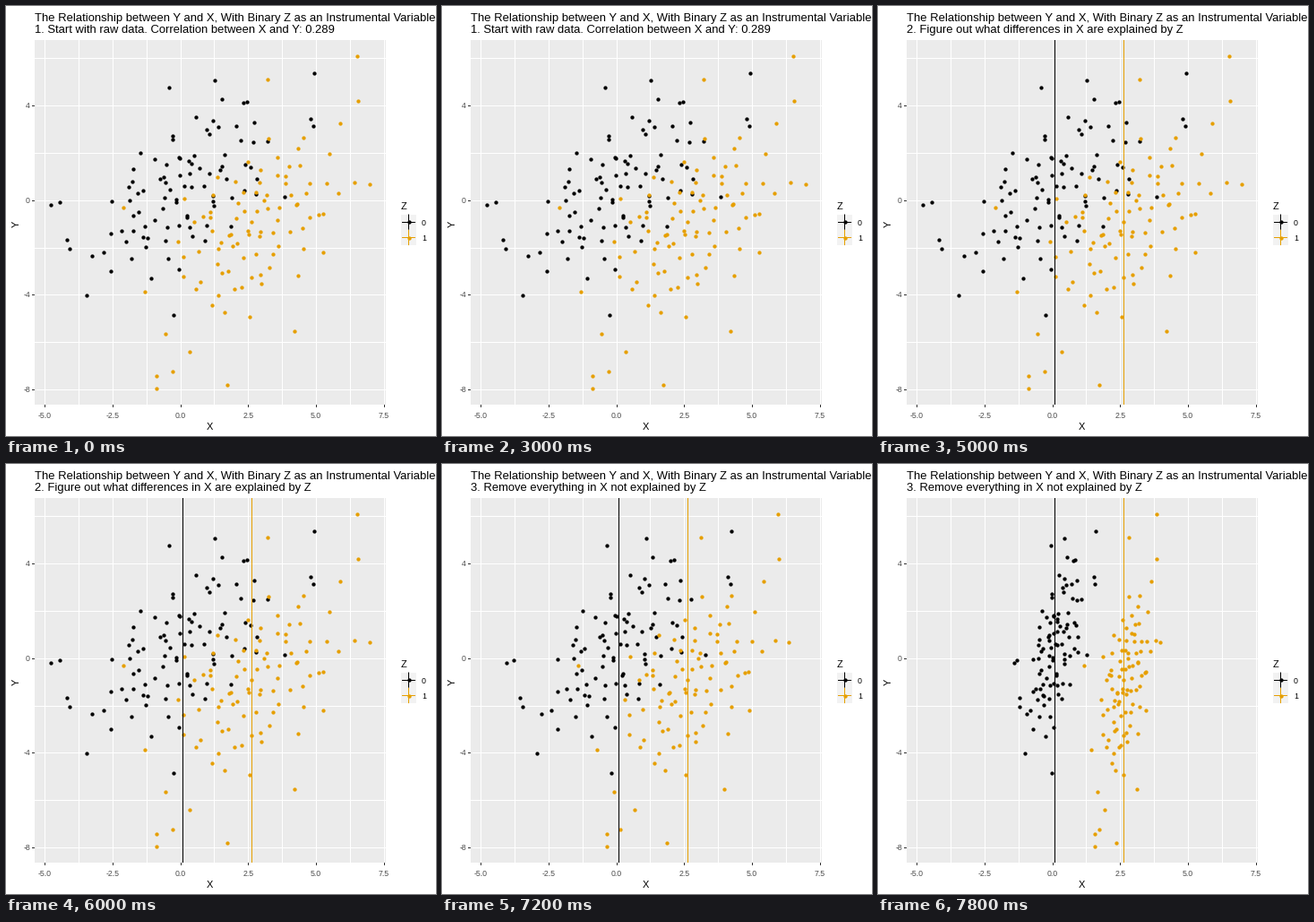
Animation, 480 px wide and 480 px high, one loop 8 s. Source, as a matplotlib script:

```python
import numpy as np
import matplotlib.pyplot as plt
from matplotlib.animation import FuncAnimation
from matplotlib.patches import Rectangle

plt.rcParams["font.family"] = "Liberation Sans"

SIZE = 480
FRAMES, INTERVAL = 40, 200
LEFT, RIGHT, TOP, BOTTOM = 32, 424, 38, 445
COLORS = BLACK, ORANGE = "#000000", "#E69F00"
MEANS = (197, 274)

TITLE = "The Relationship between Y and X, With Binary Z as an Instrumental Variable"
STEPS = (
    "1. Start with raw data. Correlation between X and Y: 0.289",
    "2. Figure out what differences in X are explained by Z",
    "3. Remove everything in X not explained by Z",
)
STEP_2, LINES_IN, SQUEEZE = 21, 23, 34  # frames where each stage begins
SQUEEZE_LENGTH = 8

# The few extreme observations, in stage pixels.
EXTREMES_0 = [(50, 222), (60, 219), (68, 261), (71, 271), (90, 323),
              (182, 91), (187, 345), (233, 83), (241, 104), (269, 107),
              (311, 213), (340, 126), (343, 134), (344, 75)]
EXTREMES_1 = [(131, 225), (168, 413), (168, 427), (178, 366), (186, 408),
              (205, 386), (247, 423), (292, 82), (322, 363), (373, 131),
              (389, 197), (392, 56), (393, 106), (406, 199)]

rng = np.random.default_rng(7)


def sample(count, center, spread, corr, reach=1.9):
    """Evenly covered, jittered bivariate normal cut off at `reach` sigmas."""
    k = np.arange(count) + 0.5
    radius = np.sqrt(-2 * np.log(1 - k / count * (1 - np.exp(-reach ** 2 / 2))))
    angle = k * np.pi * (3 - np.sqrt(5))
    a = radius * np.cos(angle) + rng.normal(0, 0.13, count)
    b = radius * np.sin(angle) + rng.normal(0, 0.13, count)
    b = corr * a + np.sqrt(1 - corr ** 2) * b
    return np.column_stack([center[0] + spread[0] * a,
                            center[1] - spread[1] * b])


def px(x):
    return 194.65 + 30.25 * x


def py(y):
    return 216.65 - 26.45 * y


fig = plt.figure(figsize=(SIZE / 72, SIZE / 72), dpi=72, facecolor="white")
ax = fig.add_axes([0, 0, 1, 1])
ax.set_xlim(0, SIZE)
ax.set_ylim(SIZE, 0)
ax.axis("off")


def box(x, y, w, h, color):
    ax.add_patch(Rectangle((x, y), w, h, fc=color, lw=0, zorder=0))


def vline(x, top, bottom, color, zorder=1):
    """One-pixel column."""
    return ax.plot([round(x) + 0.5] * 2, [top, bottom], color=color, lw=1,
                   zorder=zorder, solid_capstyle="butt", snap=False)[0]


def hline(y, left, right, color):
    """One-pixel row."""
    ax.plot([left, right], [round(y) + 0.5] * 2, color=color, lw=1,
            zorder=1, solid_capstyle="butt", snap=False)


def label(x, y, text, size, color="black", ha="left", **kw):
    return ax.text(x, y, text, size=size, color=color, ha=ha,
                   va=kw.pop("va", "baseline"), **kw)


def dots(points, color):
    return ax.scatter(*np.transpose(points), s=4.3 ** 2, c=color,
                      linewidths=0, antialiased=False, zorder=3)


def draw_panel():
    box(LEFT, TOP, RIGHT - LEFT, BOTTOM - TOP, "#EBEBEB")
    for x in np.arange(-5, 7.6, 1.25):
        vline(px(x), TOP, BOTTOM, "white")
    for y in range(-8, 7, 2):
        hline(py(y), LEFT, RIGHT, "white")
    for x in np.arange(-5, 7.6, 2.5):
        vline(px(x), BOTTOM, BOTTOM + 3, "#333333")
        label(px(x), 460.5, f"{x:.1f}", 8.8, "#4D4D4D", "center")
    for y in range(-8, 5, 4):
        hline(py(y), LEFT - 3, LEFT, "#333333")
        label(27, py(y) + 3, str(y), 8.8, "#4D4D4D", "right")
    label(227.7, 473, "X", 11, ha="center")
    label(11.5, 243, "Y", 11, ha="center", va="center", rotation=90)


def draw_legend():
    label(441, 227, "Z", 11)
    for row, color in enumerate(COLORS):
        top = 232.5 + 17.3 * row
        mid = top + 8.7
        box(441, top, 17.3, 17.3, "#F2F2F2")
        vline(449, top, top + 17.3, color)
        hline(mid - 0.5, 442, 457, color)
        dots([(449.5, mid)], color)
        label(464, mid + 4, str(row), 8.8)


draw_panel()
draw_legend()
label(32, 17, TITLE, 12.97)
subtitle = label(32, 30, STEPS[0], 12.97)

groups = (
    np.vstack([EXTREMES_0, sample(84, (197, 205), (56, 57), 0.55)]),
    np.vstack([EXTREMES_1, sample(84, (278, 244), (54, 58), 0.45)]),
)
clouds = [dots(g, c) for g, c in zip(groups, COLORS)]
mean_lines = [vline(m, TOP, BOTTOM, c, zorder=4)
              for m, c in zip(MEANS, COLORS)]


def update(i):
    subtitle.set_text(STEPS[(i >= STEP_2) + (i > SQUEEZE)])
    t = np.clip((i - SQUEEZE) / SQUEEZE_LENGTH, 0, 1)
    eased = (1 - np.cos(np.pi * t)) / 2
    for cloud, points, mean, rule in zip(clouds, groups, MEANS, mean_lines):
        x = points[:, 0] + (mean + 0.5 - points[:, 0]) * eased
        cloud.set_offsets(np.column_stack([x, points[:, 1]]))
        rule.set_visible(i >= LINES_IN)
    return [subtitle, *clouds, *mean_lines]


anim = FuncAnimation(fig, update, frames=FRAMES, interval=INTERVAL,
                     repeat=True, repeat_delay=0, blit=False)
plt.show()
```
